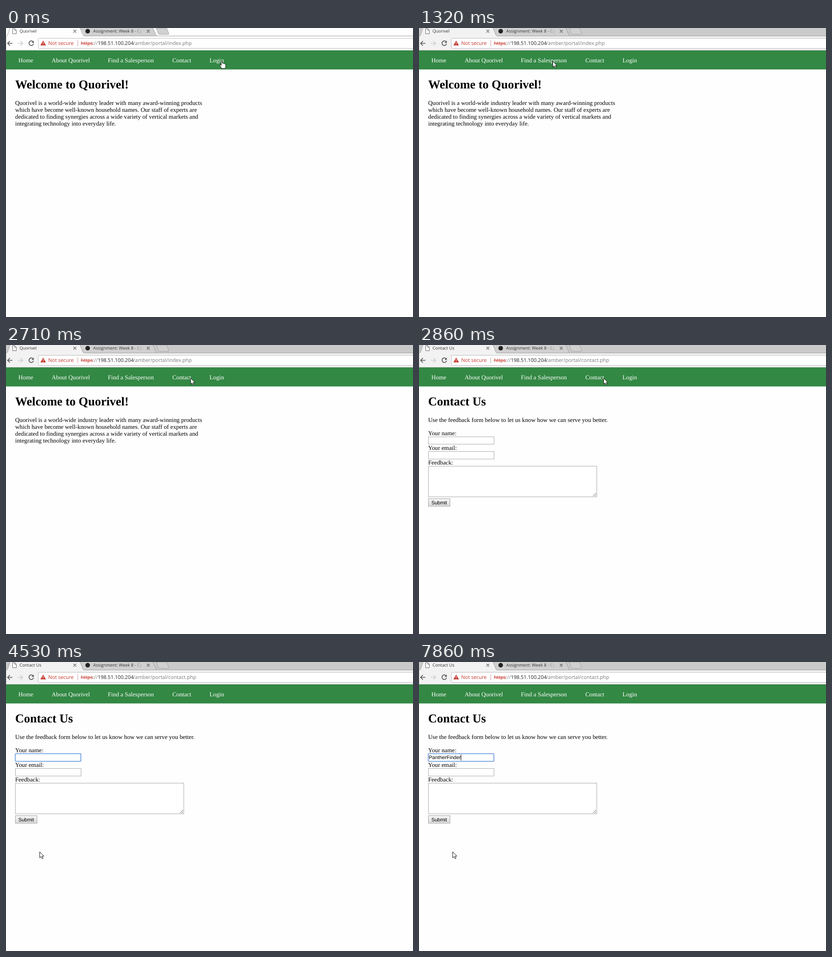
An HTML page that plays this animation: 887x631 px, repeating every 8 s.

```html
<!DOCTYPE html>
<html lang="en">
<head>
<meta charset="utf-8">
<title>Contact form</title>
<style>
  html, body { margin: 0; width: 100%; height: 100%; overflow: hidden; background: #fefefe; }
  svg { display: block; }
  text { text-rendering: geometricPrecision; white-space: pre; }
  .page { font: 13.25px "Liberation Serif", serif; }
  .heading { font-size: 26.5px; font-weight: bold; }
  .ui { font: 11px "Open Sans", sans-serif; }
  .tab { font-size: 9.4px; fill: #333; }
  .control { font: 11px "Liberation Sans", sans-serif; }
  .field { fill: #fff; stroke: #a9a9a9; }
  .line { fill: none; stroke: #555; }
</style>
</head>
<body>
<svg width="887" height="631" viewBox="0 0 887 631">
  <defs>
    <linearGradient id="fade" gradientUnits="userSpaceOnUse" x1="276" x2="299">
      <stop stop-color="#333"/><stop offset="1" stop-color="#333" stop-opacity="0"/>
    </linearGradient>
    <linearGradient id="buttonFill" x2="0" y2="1">
      <stop stop-color="#f8f8f8"/><stop offset="1" stop-color="#dadada"/>
    </linearGradient>
  </defs>
  <rect width="887" height="631" fill="#fefefe"/>

  <!-- Browser bar -->
  <rect id="strip" width="887" height="18"/>
  <path d="M162 0H320L328 17H170z" fill="#d0d0d0"/>
  <path d="M320 0L328 17.5" class="line" style="stroke:#999"/>
  <path d="M327.5 0H350L355 12.5Q355 14 353 14H335Q333 14 332 12.5z" fill="#d0d0d0" stroke="#a2a2a2"/>
  <path id="toolbar" d="M0 17.5H1Q3 17 4 14L9 -1H161L167 14Q168 17 170 17.5H888V49H0z" stroke="#a0a0a0"/>
  <path d="M14.5 1.5H19L22.5 5V12.5H14.5zM19 1.5V5H22.5" fill="#fff" stroke="#666"/>
  <path d="M147 4l6 6m0-6l-6 6M307 4l6 6m0-6l-6 6" class="line" stroke-width="1.3"/>
  <circle cx="178" cy="7" r="5" fill="#222"/>
  <g class="ui">
    <text id="tabTitle" class="tab" x="29.5" y="10"></text>
    <text class="tab" x="190" y="10" style="fill:url(#fade)">Assignment: Week 8 - Cy</text>
    <rect x="70.5" y="22.5" width="830" height="22" rx="2" fill="#fff" stroke="#bbb"/>
    <path d="M81 27.5L87 38H75z" fill="#c5372c"/>
    <path d="M81 31v3.5m0 1v1.3" stroke="#fff" stroke-width="1.2"/>
    <path d="M156.5 27V40" stroke="#c99"/>
    <text x="92" y="37.3" fill="#c5372c">Not secure</text>
    <text x="163" y="37.3" fill="#c5372c">https</text>
    <path d="M163 34H189" stroke="#c5372c"/>
    <text x="189" y="37.3" fill="#777">://</text>
    <text x="200" y="37.3" fill="#222">198.51.100.204</text>
    <text id="path" x="277" y="37.3" fill="#777"></text>
  </g>
  <path d="M14 33.5H3.5M8.5 28.5l-5 5 5 5" class="line" stroke-width="1.7"/>
  <path d="M26 33.5H36.5M31.5 28.5l5 5-5 5" class="line" stroke-width="1.6" style="stroke:#ccc"/>
  <path d="M59 30a5 5 0 1 0 1 4.5" class="line" stroke-width="1.7"/>
  <path d="M60.5 27.5v5h-5z" fill="#555"/>

  <!-- Page -->
  <g class="page">
    <rect y="49" width="887" height="41.5" fill="#338844"/>
    <g fill="#fff">
      <text x="27" y="75">Home</text>
      <text x="99.5" y="75">About Quorivel</text>
      <text x="222" y="75">Find a Salesperson</text>
      <text x="362.5" y="75">Contact</text>
      <text x="443.5" y="75">Login</text>
    </g>
    <g id="home">
      <text class="heading" x="20" y="132">Welcome to Quorivel!</text>
      <text x="20" y="168">Quorivel is a world-wide industry leader with many award-winning products</text>
      <text x="20" y="183">which have become well-known household names. Our staff of experts are</text>
      <text x="20" y="198">dedicated to finding synergies across a wide variety of vertical markets and</text>
      <text x="20" y="213">integrating technology into everyday life.</text>
    </g>
    <g id="contact">
      <text class="heading" x="20" y="132">Contact Us</text>
      <text x="20" y="168">Use the feedback form below to let us know how we can serve you better.</text>
      <text x="20" y="196.500">Your name:</text>
      <text x="20" y="229">Your email:</text>
      <text x="20" y="261">Feedback:</text>
      <rect class="field" x="20.5" y="200.5" width="143" height="16"/>
      <rect class="field" x="20.5" y="232.5" width="143" height="16.5"/>
      <rect class="field" x="20.5" y="264.5" width="367" height="67"/>
      <path d="M379 330l7-7m-3 7l3-3" class="line"/>
      <rect id="focus" x="20.2" y="200.2" width="143" height="16.6" rx="1" fill="#fff" stroke="#5a8fdc" stroke-width="1.5"/>
      <rect x="20.5" y="335.5" width="47" height="16.5" fill="url(#buttonFill)" stroke="#a0a0a0"/>
      <text class="control" x="44" y="347.5" text-anchor="middle">Submit</text>
      <text id="typed" class="control" x="21.5" y="212.3"></text>
      <rect id="caret" y="202" width="1" height="13"/>
    </g>
  </g>

  <path id="cursor" stroke="#111" stroke-linejoin="round"/>
</svg>
<script>
const LOOP = 8000, ACTIVATE = 500, PAGE_LOAD = 2860, FOCUS = 4010, BLINK = 515;
const POINTER_STEP = 139, POINTER_OFFSET = 77;

const POINTERS = {
  arrow: "M.5 .5V13.5L3.5 10.8 5.6 15.5 7.8 14.6 5.7 10H9.7z",
  hand: "M-1 1.5q1.300-2 2.600 0V6q2.500-1 2.800 .7 2-.5 2.500 1 2-.2 2 1.700v3.200q0 2-1.400 5H.2Q-1 15-4.200 11q0-3 2.200-1L-1 11z",
  beam: "M-2.5-6.5L0-6 2.500-6.500M0-6V6M-2.500 6.500L0 6 2.500 6.500"
};

// Each glide starts at a time, takes a while and rests at x, y.
const GLIDES = [
  { start: 0, time: 0, x: 470, y: 71, rest: "hand" },
  { start: 490, time: 0, x: 468, y: 71 },
  { start: 910, time: 140, x: 291, y: 72 },
  { start: 1330, time: 260, x: 385, y: 73 },
  { start: 1590, time: 540, x: 27, y: 92 },
  { start: 2130, time: 350, x: 402, y: 72 },
  { start: 3180, time: 235, x: 0, y: 312 },
  { start: 3420, time: 130, x: 74, y: 239, rest: "beam" },
  { start: 3600, time: 370, x: 80, y: 209, rest: "beam" },
  { start: 4010, time: 380, x: 73, y: 414 }
];

const WORDS = [
  { text: "Panther", start: 5760, pace: 158 },
  { text: "Finder", start: 7210, pace: 130 }
];

const $ = id => document.getElementById(id);
const show = (id, visible) => $(id).style.display = visible ? "" : "none";
const easeOut = p => 1 - (1 - p) ** 1.5;

function drawPointer(time) {
  // The pointer is refreshed at a slow, steady rate.
  const steps = Math.floor((time - POINTER_OFFSET) / POINTER_STEP);
  const t = Math.max(0, POINTER_OFFSET + steps * POINTER_STEP);
  const index = GLIDES.findLastIndex(glide => glide.start <= t);
  const to = GLIDES[index], from = GLIDES[index - 1] || to;
  const resting = t >= to.start + to.time;
  const p = resting ? 1 : easeOut((t - to.start) / to.time);
  const at = axis => Math.round(from[axis] + (to[axis] - from[axis]) * p);
  const kind = resting && to.rest || "arrow";
  const cursor = $("cursor");
  cursor.setAttribute("d", POINTERS[kind]);
  cursor.setAttribute("transform", `translate(${at("x")} ${at("y")})`);
  cursor.setAttribute("fill", kind === "beam" ? "none" : "#fff");
}

function drawTyping(t) {
  const focused = t >= FOCUS;
  let typed = "", lastKey = FOCUS;
  for (const { text, start, pace } of WORDS) {
    if (t < start) break;
    const count = Math.min(text.length, 1 + Math.floor((t - start) / pace));
    typed += text.slice(0, count);
    lastKey = start + (count - 1) * pace;
  }
  $("typed").textContent = typed;
  const end = 21.2 + (typed && $("typed").getComputedTextLength());
  $("caret").setAttribute("x", Math.round(end));
  show("focus", focused);
  show("caret", focused && Math.floor((t - lastKey) / BLINK) % 2 === 0);
}

function draw(t) {
  const onContact = t >= PAGE_LOAD, active = t >= ACTIVATE;
  show("home", !onContact);
  show("contact", onContact);
  $("tabTitle").textContent = onContact ? "Contact Us" : "Quorivel";
  $("path").textContent = "/amber/portal/" + (onContact ? "contact.php" : "index.php");
  $("strip").setAttribute("fill", active ? "#cacaca" : "#fefefe");
  $("toolbar").setAttribute("fill", active ? "#f2f2f2" : "#fefefe");
  drawTyping(t);
  drawPointer(t);
}

const begin = performance.now();
function tick() {
  draw((performance.now() - begin) % LOOP);
  requestAnimationFrame(tick);
}
tick();
</script>
</body>
</html>
```
